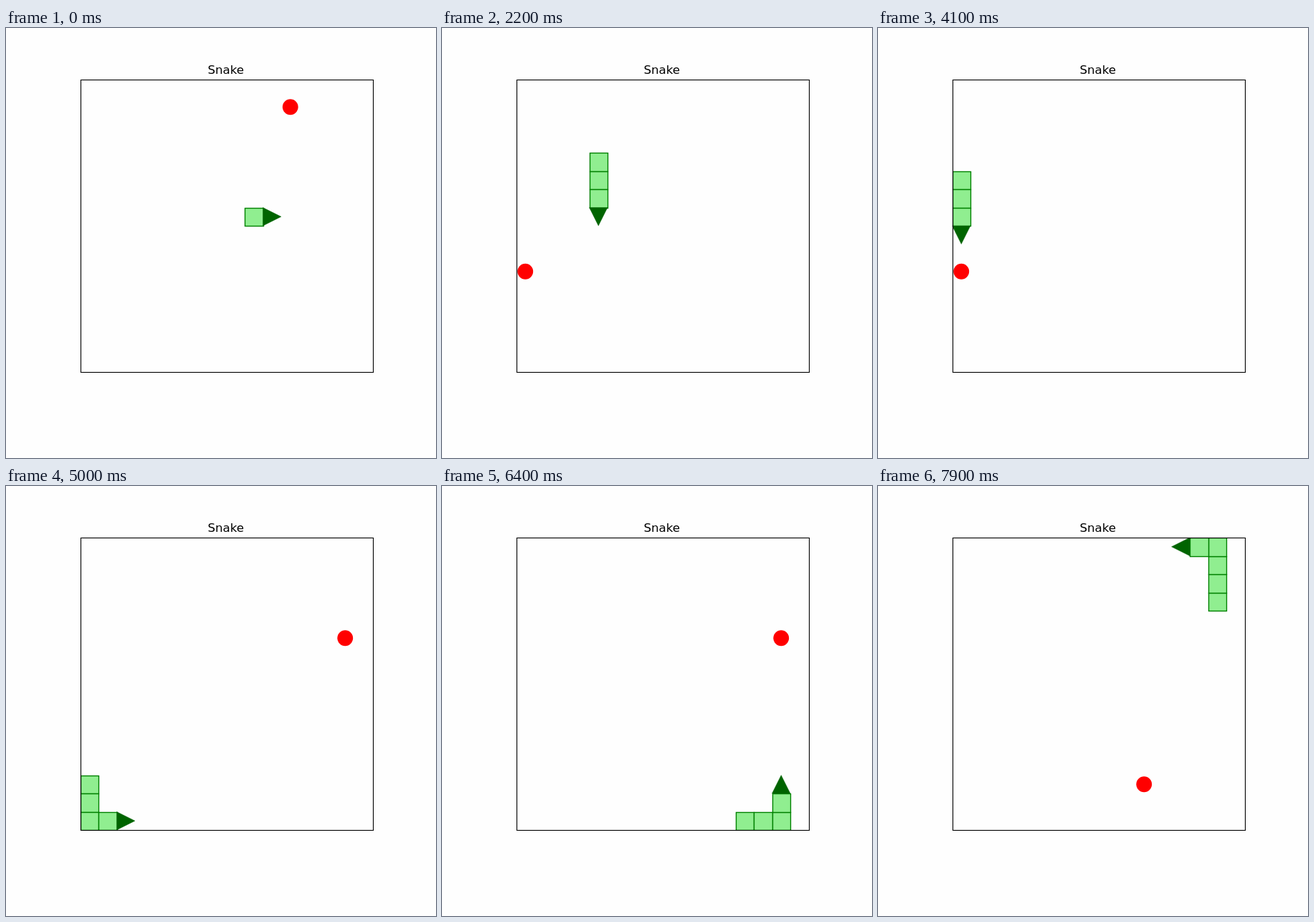
Recreate the animation shown at these times as an HTML page. Size 600 by 600 pixels, loop 8 s.

```html
<!DOCTYPE html>
<html lang="en">
<head>
<meta charset="utf-8">
<title>Snake</title>
<style>
  html, body { margin: 0; width: 100%; height: 100%; overflow: hidden; background: #fefefe; }
  svg { display: block; }
  text { font: 16.67px "DejaVu Sans", sans-serif; text-anchor: middle; }
  .body { fill: lightgreen; stroke: green; stroke-width: 1.39; }
  .head { fill: darkgreen; stroke: darkgreen; stroke-width: .4; }
</style>
</head>
<body>
<svg width="600" height="600" viewBox="0 0 600 600">
  <clipPath id="board"><rect x="103.5" y="72" width="408" height="408"/></clipPath>
  <text x="306.8" y="64">Snake</text>
  <g id="game" clip-path="url(#board)"></g>
  <rect x="104.5" y="72.5" width="408" height="408" fill="none" stroke="#000" stroke-width="1.11"/>
</svg>
<script>
const STEP = 100, STEPS = 80, CELL = 25.5, LEFT = 103.5, TOP = 72;
const DIRS = { R: [1, 0], D: [0, 1], L: [-1, 0], U: [0, -1] };
const ROUTE = 'R2 U7 L7 D7 L1 U7 L3 D15 R14 U15 L2';
// Step at which each food appears, then its column and row
const FOODS = [[0, 11, 1], [7, 4, 7], [22, 0, 10], [43, 14, 5], [72, 10, 13]];

const path = [{ x: 9, y: 7 }];
for (const leg of ROUTE.split(' ')) {
  const [dx, dy] = DIRS[leg[0]];
  for (let n = +leg.slice(1); n > 0; n--) {
    const last = path[path.length - 1];
    path.push({ x: last.x + dx, y: last.y + dy, dx, dy });
  }
}

const px = col => LEFT + CELL * col;
const py = row => TOP + CELL * row;
const snap = v => Math.floor(v + .5) + .5;

function segment({ x, y }) {
  const l = snap(px(x)), t = snap(py(y));
  return `<rect class="body" x="${l}" y="${t}" width="${snap(px(x + 1)) - l}" height="${snap(py(y + 1)) - t}"/>`;
}

function head({ x, y, dx, dy }) {
  const angle = Math.atan2(dy, dx) * 180 / Math.PI, h = CELL / 2;
  return `<path class="head" d="M${-h} ${-h}L${h} 0L${-h} ${h}Z"
    transform="translate(${px(x + .5)} ${py(y + .5)}) rotate(${angle})"/>`;
}

function food([, x, y]) {
  return `<circle cx="${px(x + .5)}" cy="${py(y + .5)}" r="10.9" fill="red"/>`;
}

const game = document.getElementById('game');
let shown = -1;

function draw(now) {
  const step = Math.floor(now / STEP) % STEPS;
  if (step !== shown) {
    shown = step;
    const eaten = FOODS.filter(f => f[0] <= step);
    const at = step + 1, length = eaten.length;
    game.innerHTML = food(eaten[length - 1]) +
      path.slice(at - length, at).map(segment).join('') + head(path[at]);
  }
  requestAnimationFrame(draw);
}
draw(0);
</script>
</body>
</html>
```
